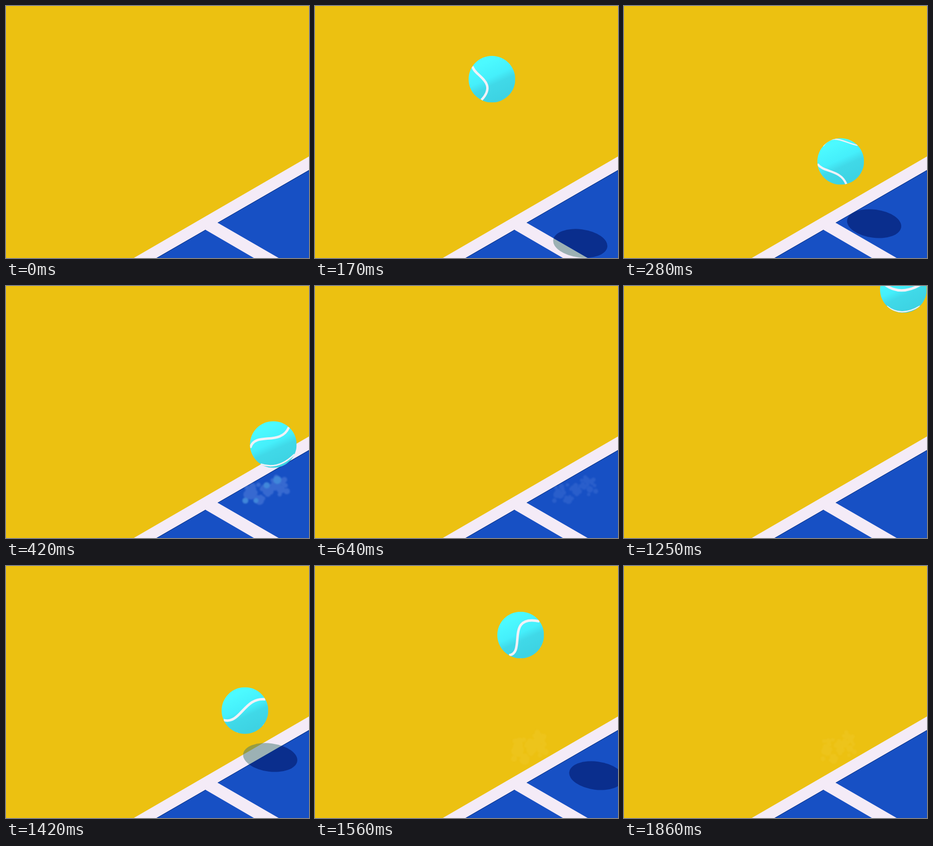
Recreate the animation shown at these times as an HTML page with a canvas. Size 600x500 px, loop 1.89 s.

```html
<!DOCTYPE html>
<html>
<head>
<meta charset="utf-8">
<style>
html, body { margin: 0; overflow: hidden; width: 600px; height: 500px; background: #ecc111; }
canvas { display: block; }
</style>
</head>
<body>
<canvas id="stage" width="600" height="500"></canvas>
<script>
const c = document.getElementById('stage').getContext('2d');
const LOOP = 1890, R = 46.2;

// The ball crosses at steady speed vx and meets the ground at (x, y) at time hit.
// Its height is v * d + a * d * d, with d the time to or since the hit.
// A seam pose is [start angle, end angle, bend, bend]; it turns from t0 to t1.
const shots = [
  { from: 80, to: 583, hit: 350, x: 478.5, y: 380.5, vx: 0.716,
    fall: { v: 0.876, a: 0.00245 }, rise: { v: 0.93, a: 0 }, shadowStays: false,
    t0: 170, t1: 420, seams: [
      { a: [214, 117, 2, -42], b: [123, 25, 14, 14] },
      { a: [-100, -40, -30, -30], b: [-188, -48, -25, 26] }
    ] },
  { from: 1250, to: 1690, hit: 1450, x: 459.5, y: 334.5, vx: -0.471,
    fall: { v: 1.645, a: 0 }, rise: { v: 1.99, a: -0.0019 }, shadowStays: true,
    t0: 1250, t1: 1560, seams: [
      { a: [200, -20, 23, 23], b: [120, -36, 23, -61] },
      { a: [135, 45, 15, 15], b: [90, 30, 30, 30] }
    ] }
];

const lerp = (a, b, u) => a + (b - a) * u;
const clamp = u => Math.max(0, Math.min(1, u));
const rand = n => { const v = Math.sin(n * 12.9898) * 43758.5453; return v - Math.floor(v); };

function place(s, t) {
  const d = Math.abs(t - s.hit), { v, a } = t < s.hit ? s.fall : s.rise;
  const height = v * d + a * d * d;
  const x = s.x + s.vx * (t - s.hit), y = s.y - height;
  const reach = 34 + 1.24 * height;
  return { x, y, sx: x + reach * 0.537, sy: y + reach };
}

function courtPath() {
  c.beginPath();
  c.moveTo(419, 430); c.lineTo(600, 325.5); c.lineTo(600, 500); c.lineTo(540, 500);
  c.closePath();
  c.moveTo(298, 500); c.lineTo(395, 444); c.lineTo(491, 500);
  c.closePath();
}

function shadow(p, color) {
  if (!p) return;
  c.fillStyle = color;
  c.beginPath();
  c.ellipse(p.sx, p.sy, 54, 28, 0.13, 0, 7);
  c.fill();
}

function court(p) {
  c.fillStyle = '#ecc111';
  c.fillRect(0, 0, 600, 500);
  c.fillStyle = '#f4ebf7';
  c.beginPath();
  c.moveTo(253, 500); c.lineTo(600, 298.5); c.lineTo(600, 500);
  c.fill();
  shadow(p, 'rgba(70,120,115,.5)');
  c.save();
  courtPath();
  c.fillStyle = '#1750c4';
  c.fill();
  c.clip();
  shadow(p, 'rgba(2,24,105,.6)');
  c.strokeStyle = '#0c3484';
  c.lineWidth = 2;
  c.beginPath();
  c.moveTo(298, 500); c.lineTo(395, 444);
  c.moveTo(419, 430); c.lineTo(600, 325.5);
  c.stroke();
  c.restore();
}

// A ragged cloud of random lumps; every step-th lump is drawn.
function dust(x, y, w, h, size, color, alpha, step = 1) {
  c.save();
  c.globalAlpha = alpha;
  c.fillStyle = color;
  c.filter = 'blur(1.5px)';
  c.beginPath();
  for (let i = 0; i < 36; i += step) {
    const u = i / 35 - 0.5;
    const px = x + w * u;
    const py = y - 0.25 * w * u + (rand(i + 1) - 0.5) * h * (1 - u * u);
    const r = (4 + 6 * rand(i + 50)) * size;
    c.moveTo(px + r, py);
    c.arc(px, py, r, 0, 7);
  }
  c.fill();
  c.restore();
}

function seam(pose) {
  const [a, b] = pose.map(v => v * Math.PI / 180);
  const x0 = R * Math.cos(a), y0 = R * Math.sin(a);
  const dx = R * Math.cos(b) - x0, dy = R * Math.sin(b) - y0;
  const len = Math.hypot(dx, dy);
  const off = (u, bend) => [x0 + dx * u - dy / len * bend, y0 + dy * u + dx / len * bend];
  // Seams look thinner towards the rim.
  const mid = Math.hypot(...off(0.5, (pose[2] + pose[3]) * 3 / 8)) / R;
  c.lineWidth = 1 + 4 * Math.sqrt(Math.max(0, 1 - mid * mid));
  c.beginPath();
  c.moveTo(x0, y0);
  c.bezierCurveTo(...off(0.28, pose[2]), ...off(0.62, pose[3]), x0 + dx, y0 + dy);
  c.stroke();
}

function ball(s, p, t) {
  c.save();
  c.translate(p.x, p.y);
  c.beginPath();
  c.arc(0, 0, R, 0, 7);
  c.clip();
  const g = c.createLinearGradient(-14, -34, 18, 36);
  g.addColorStop(0, '#4cfaff');
  g.addColorStop(0.42, '#45effb');
  g.addColorStop(0.62, '#40d9e8');
  g.addColorStop(1, '#3dd3e3');
  c.fillStyle = g;
  c.fillRect(-R, -R, 2 * R, 2 * R);
  c.strokeStyle = '#f2f1f7';
  const u = (t - s.t0) / (s.t1 - s.t0);
  s.seams.forEach(({ a, b }) => seam(a.map((v, i) => lerp(v, b[i], u))));
  c.restore();
}

function draw(t) {
  const s = shots.find(s => t >= s.from && t < s.to);
  const p = s && place(s, t);
  court(p && (s.shadowStays || t < s.hit) ? p : null);

  const [inside, outside] = shots.map(s => t - s.hit);
  if (inside > 0 && inside < 590) {
    const life = 1 - inside / 590;
    const size = (0.4 + 0.6 * clamp(inside / 70)) * (0.5 + 0.55 * life);
    c.save();
    courtPath();
    c.clip();
    dust(515, 403, 82, 40, size, '#5580dc', 0.6 * life);
    dust(515, 403, 82, 40, size, '#4ba6e4', 0.7 * clamp(1 - inside / 250), 9);
    c.restore();
  }
  if (outside > 0) {
    const size = 1.1 - 0.3 * clamp(outside / 400);
    dust(425, 358, 62, 52, size, '#f6cf45', 0.2);
  }
  if (s) ball(s, p, t);
}

const start = performance.now();
function tick() {
  draw((performance.now() - start) % LOOP);
  requestAnimationFrame(tick);
}
tick();
</script>
</body>
</html>
```
